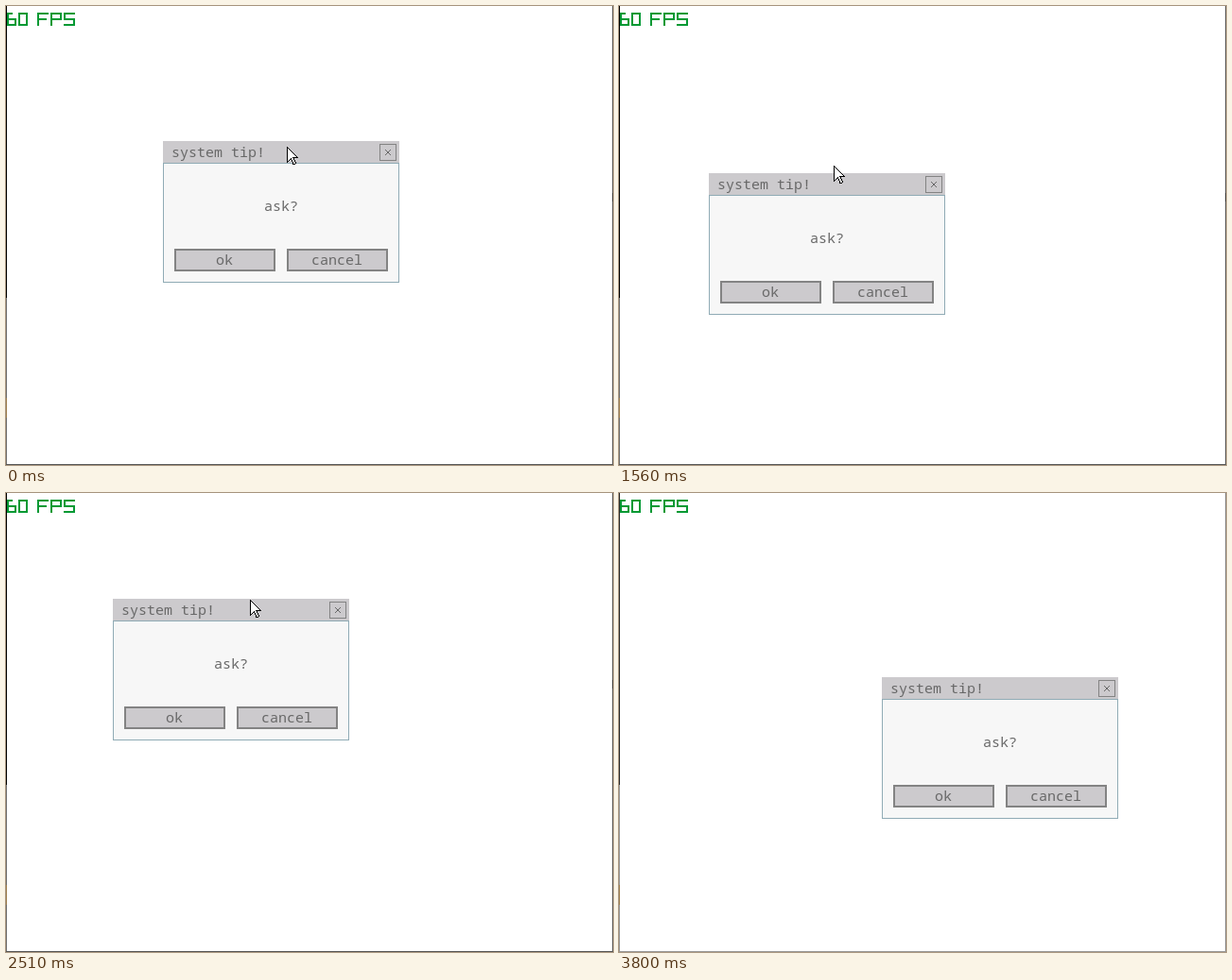
Recreate the animation shown at these times as an HTML page. Size 642x486 px, loop 3900 ms.

```html
<!DOCTYPE html>
<html lang="en">
<head>
<meta charset="utf-8">
<title>Draggable dialog</title>
<style>
  html, body { margin: 0; width: 100%; height: 100%; overflow: hidden; background: #fff; }
  svg { display: block; width: 642px; height: 486px; }
  rect, #cursor, .fps { shape-rendering: crispEdges; }
  text { font: 15px "Noto Sans Mono", "Liberation Mono", monospace; fill: #686868; white-space: pre; }
  .fps { fill: none; stroke: #009933; stroke-width: 2; }
  .bar { fill: #cccacd; }
  .panel { fill: #f7f7f7; stroke: #90abb5; }
  .button { fill: #cccacd; stroke: #838383; stroke-width: 2; }
  .close { fill: #cccacd; stroke: #838383; }
  .cross { stroke: #686868; }
  .edge { fill: #555; }
  .side { fill: #707070; }
  .dark { fill: #000; }
  .inactive .edge, .inactive .side { fill: #999; }
  .inactive .dark { fill: #2a2a2a; }
</style>
</head>
<body>
<svg id="stage" viewBox="0 0 642 486">
  <rect class="side" width="1" height="486"/>
  <rect class="dark" width="1" height="309"/>
  <rect y="415" width="1" height="21" fill="#a08050"/>
  <rect class="side" x="641" width="1" height="486"/>
  <rect class="edge" x="641" y="198" width="1" height="9"/>
  <rect class="edge" y="485" width="642" height="1"/>

  <!-- "60 FPS" in blocky strokes -->
  <path class="fps" role="img" aria-label="60 FPS" d="M7 8H2V20H10V14H2
    M14 8H22V20H14Z M45 8H34V21M34 14H43 M48 21V8H58V14H48 M73 8H62V14H72V20H61"/>

  <g id="dialog">
    <rect class="bar" width="250" height="24"/>
    <rect class="panel" x=".5" y="23.5" width="249" height="126"/>
    <text x="9" y="17">system tip!</text>
    <rect class="close" x="229.5" y="3.5" width="17" height="17"/>
    <path class="cross" d="M235 9L241 15M241 9L235 15"/>
    <text x="107" y="74">ask?</text>
    <rect class="button" x="13" y="115" width="105" height="22"/>
    <text x="56" y="131">ok</text>
    <rect class="button" x="132" y="115" width="105" height="22"/>
    <text x="157" y="131">cancel</text>
  </g>

  <path id="cursor" fill="#fff" stroke="#000" d="M.5 .5V16.5L4.5 12.5L7 18.5H8.5L9.5 17.5L7 11.5H11.5Z"/>
</svg>
<script>
  const LOOP = 3900, DRAG_START = 760, TICK = 40.65;
  const GRIP = [131, 6];
  // Key points of the circling drag: tick, x, y
  const keys = [
    [0, 166, 143], [9, 189, 145], [11, 202, 153], [13, 208, 190],
    [17, 118, 211], [20, 95, 177], [23, 116, 143], [28, 241, 171],
    [32, 220, 213], [37, 156, 196], [41, 110, 134], [44, 127, 107],
    [48, 243, 127], [50, 257, 141], [54, 280, 178], [56, 278, 195]
  ];
  const last = keys.length - 1, release = keys[last][0];
  const [stage, dialog, cursor] =
    ["stage", "dialog", "cursor"].map(id => document.getElementById(id));

  function slope(i, axis) {
    if (i === 0 || i === last) return 0;
    const a = keys[i - 1], b = keys[i + 1];
    return (b[axis] - a[axis]) / (b[0] - a[0]);
  }

  // Smooth curve through the key points
  function dragAt(tick) {
    const now = Math.min(Math.max(tick, 0), release);
    const i = Math.max(0, keys.findIndex(key => key[0] >= now) - 1);
    const a = keys[i], b = keys[i + 1], span = b[0] - a[0];
    const u = (now - a[0]) / span, rest = 1 - u;
    return [1, 2].map(k => Math.round(
      a[k] * (1 + 2 * u) * rest * rest + b[k] * u * u * (3 - 2 * u)
      + span * u * rest * (slope(i, k) * rest - slope(i + 1, k) * u)));
  }

  // The pointer leads the dialog by a tick, leaves to the right,
  // then brushes the lower corner
  function pointerAt(tick) {
    if (tick <= release) {
      const ahead = tick < 0 ? 0 : tick + 1;
      return dragAt(ahead).map((v, k) => v + GRIP[k]);
    }
    const leave = (tick - release) / 5;
    if (leave <= 1) return [409 + 186 * leave ** 1.5, 201 - 30 * leave];
    const brush = tick - 67;
    return brush >= 0 && brush < 3 ? [630 - 5 * brush, 471 + 4 * brush] : null;
  }

  function place(node, [x, y]) {
    node.setAttribute("transform", `translate(${Math.round(x)} ${Math.round(y)})`);
  }

  const start = performance.now();
  function draw() {
    const t = (performance.now() - start) % LOOP;
    const tick = t < DRAG_START ? -1 : Math.floor((t - DRAG_START) / TICK + 0.4);
    const tip = pointerAt(tick);
    place(dialog, dragAt(tick));
    cursor.style.display = tip ? "" : "none";
    if (tip) place(cursor, tip);
    stage.classList.toggle("inactive", t >= 3800);
    requestAnimationFrame(draw);
  }
  draw();
</script>
</body>
</html>
```
